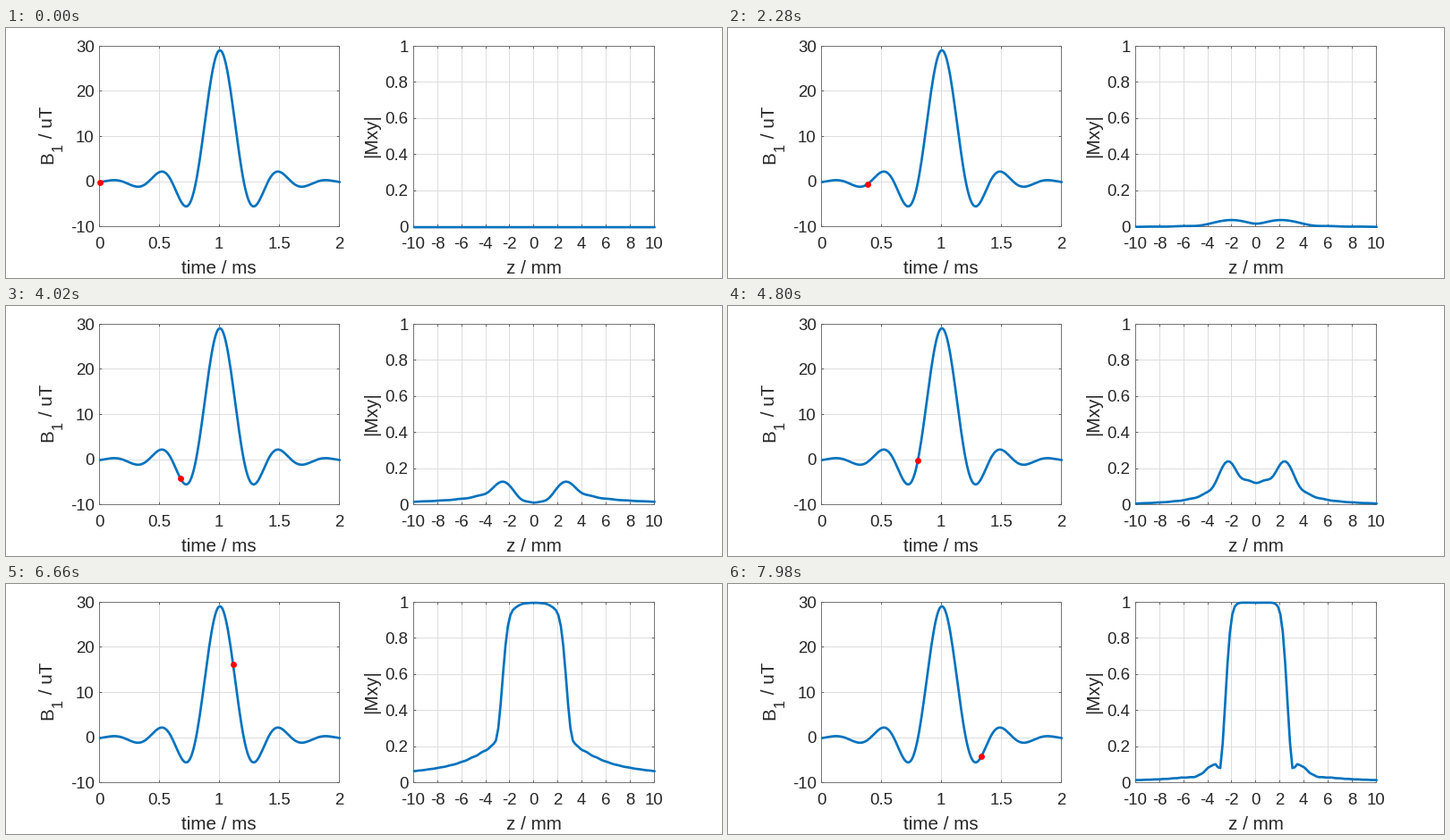
These frames come from a looping animation (800x280 px, 8 s). A matplotlib script:

```python
import numpy as np
import matplotlib.pyplot as plt
from matplotlib.animation import FuncAnimation
from matplotlib.collections import LineCollection

W, H = 800, 280
PT = 0.72                      # points per pixel at 100 dpi
TOP, BOTTOM = 20.9, 223.1
BLUE, DARK = "#0072BD", "#262626"
TICK, LABEL = 18.67, 20.6      # font sizes in pixels

plt.rcParams["font.family"] = "Liberation Sans"

# RF pulse: Gaussian-weighted sinc with a 90 degree flip
GAMMA = 267.522e6              # rad / s / T
DT = 0.01                      # ms
t = np.arange(201) * DT
shape = np.sinc((t - 1) / 0.2) * np.exp(-2 * (t - 1) ** 2)
b1 = shape * (np.pi / 2) / (GAMMA * shape.sum() * DT * 1e-3) * 1e6   # uT

# Slice-select gradient: 1 kHz per mm
z = np.linspace(-10, 10, 101)
STEPS = 134


def bloch():
    """|Mxy| along z after each pulse sample."""
    m = np.zeros((len(z), 3))
    m[:, 2] = 1
    out = []
    for b in b1[:STEPS]:
        w = np.zeros_like(m)
        w[:, 0] = GAMMA * b * 1e-6 * DT * 1e-3
        w[:, 2] = 2 * np.pi * z * DT
        angle = np.linalg.norm(w, axis=1, keepdims=True)
        axis = w / np.maximum(angle, 1e-12)
        c, s = np.cos(angle), np.sin(angle)
        along = (axis * m).sum(axis=1, keepdims=True)
        m = m * c + np.cross(axis, m) * s + axis * along * (1 - c)
        out.append(np.hypot(m[:, 0], m[:, 1]))
    return out


profiles = bloch()

fig = plt.figure(figsize=(W / 100, H / 100), dpi=100, facecolor="white")
ax = fig.add_axes([0, 0, 1, 1])
ax.set_xlim(0, W)
ax.set_ylim(H, 0)
ax.axis("off")


def text(x, y, s, size=TICK, **kw):
    ax.text(x, y, s, fontsize=size * PT, color=DARK, va="baseline", **kw)


def vtext(x, y, s, size=LABEL, ha="left"):
    text(x, y, s, size, ha=ha, rotation=90, rotation_mode="anchor")


def segments(segs, color, order):
    ax.add_collection(LineCollection(segs, colors=color, linewidths=PT,
                                     zorder=order, snap=False), autolim=False)


def pixel(v):
    """Centre of the pixel row or column that a thin line falls on."""
    return np.floor(v - 0.5) + 0.5


class Panel:
    def __init__(self, left, right, xlim, ylim):
        self.left, self.right = left, right
        self.xlim, self.ylim = xlim, ylim

    def x(self, v):
        a, b = self.xlim
        return self.left + (v - a) / (b - a) * (self.right - self.left)

    def y(self, v):
        a, b = self.ylim
        return BOTTOM + (v - a) / (b - a) * (TOP - BOTTOM)

    def frame(self, xticks, yticks, xlabel):
        l, r, u, d = map(pixel, (self.left, self.right, TOP, BOTTOM))
        n = 2.7
        grid, ticks = [], []
        for v in xticks:
            x = pixel(self.x(v))
            grid.append([(x, u), (x, d)])
            ticks += [[(x, d), (x, d - n)], [(x, u), (x, u + n)]]
            text(self.x(v) - 0.9, 246.9, f"{v:g}", ha="center")
        for v in yticks:
            y = pixel(self.y(v))
            grid.append([(l, y), (r, y)])
            ticks += [[(l, y), (l + n, y)], [(r, y), (r - n, y)]]
            text(self.left - 6.4, self.y(v) + 5.7, f"{v:g}", ha="right")
        segments(grid, "#DEDEDE", 1)
        box = [[(l, u), (r, u)], [(r, u), (r, d)],
               [(r, d), (l, d)], [(l, d), (l, u)]]
        segments(box, "#787878", 2)
        segments(ticks, "#606060", 2)
        text((self.left + self.right) / 2 - 0.8, 274.8, xlabel, LABEL,
             ha="center")


pulse = Panel(105.1, 372.9, (0, 2), (-10, 30))
pulse.frame([0, 0.5, 1, 1.5, 2], range(-10, 31, 10), "time / ms")
vtext(52, 152.2, "B")
vtext(63, 138.4, "1", 16.4)
vtext(52, 129.2, " / uT")

mag = Panel(456.0, 724.7, (-10, 10), (0, 1))
mag.frame(range(-10, 11, 2), [0, 0.2, 0.4, 0.6, 0.8, 1], "z / mm")
vtext(414, 120.6, "|Mxy|", ha="center")

style = dict(color=BLUE, lw=2.67 * PT, solid_capstyle="round",
             solid_joinstyle="round", snap=False, zorder=3)
ax.plot(pulse.x(t), pulse.y(b1), **style)
curve, = ax.plot(mag.x(z), mag.y(profiles[0]), **style)
dot, = ax.plot([], [], "o", color="red", ms=6.9 * PT, mew=0, snap=False,
               zorder=4)


def update(i):
    k = min(i // 3, STEPS - 1)     # one pulse sample every 60 ms
    dot.set_data([pulse.x(t[k])], [pulse.y(b1[k])])
    curve.set_ydata(mag.y(profiles[k]))
    return dot, curve


anim = FuncAnimation(fig, update, frames=400, interval=20, repeat=True,
                     repeat_delay=0, blit=True)
plt.show()
```
